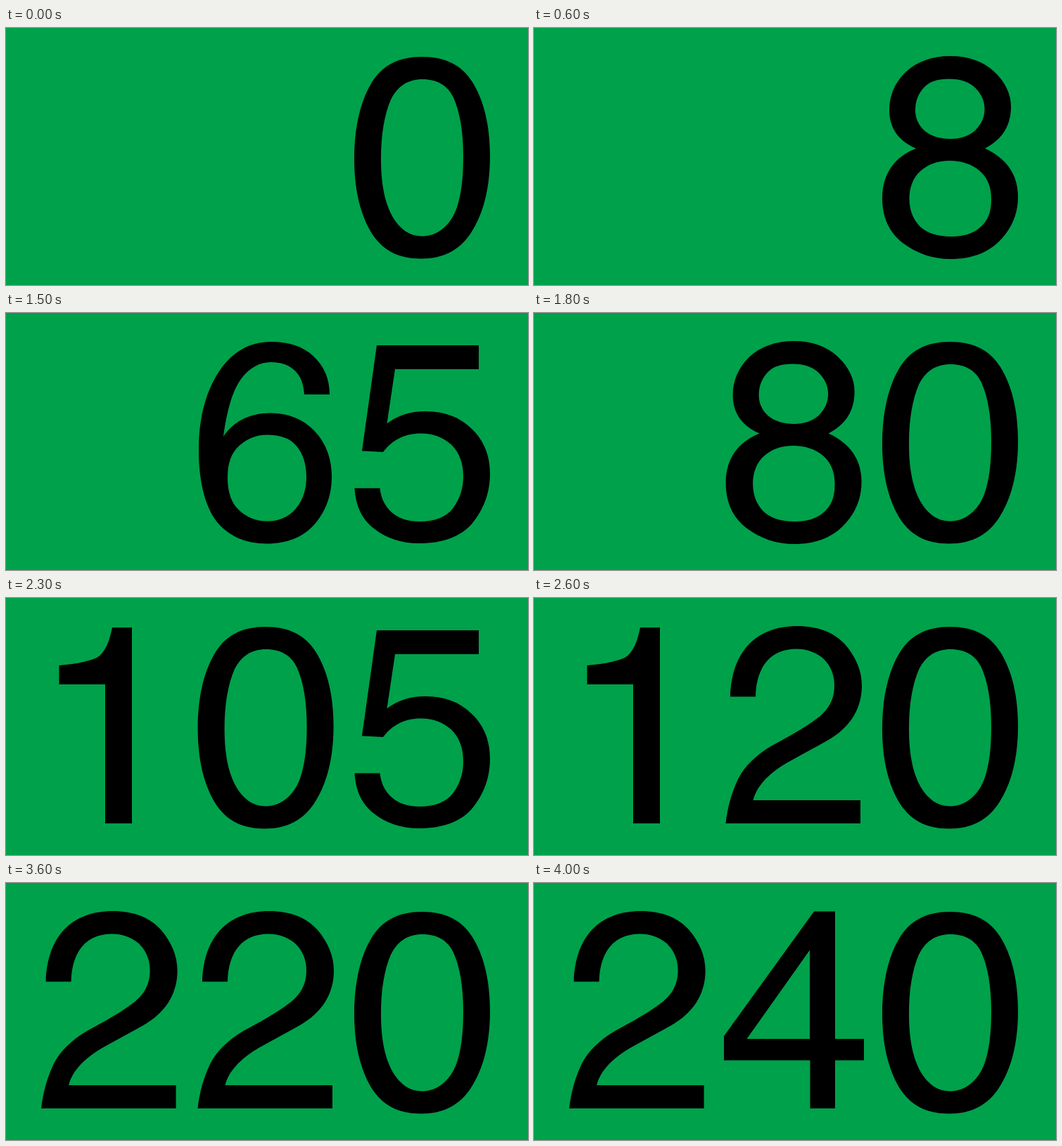
Write an HTML page that moves like this. It is 742 by 366 pixels and loops after 5 s.

```html
<!DOCTYPE html>
<html lang="en">
<head>
<meta charset="utf-8">
<title>Counter</title>
<style>
  html, body { margin: 0; width: 100%; height: 100%; overflow: hidden; background: #00a14b; }
  svg { display: block; width: 742px; height: 366px; }
</style>
</head>
<body>
<svg id="stage" viewBox="0 0 742 366" role="img" fill="#000" fill-rule="evenodd"></svg>
<script>
const PITCH = 222.4;
const KERN_11 = 29.7;
const TICK = 100;
const LOOP = 5000;

// Each digit: the column it is drawn in (0 units, 1 tens, 2 hundreds) and its outline.
const NINE = `M277 253.5H313C314 268 318 280 327 288C336 296 347 299.5 360 299.5
  C377 299.5 392 291 404 274C415 258 423 231 428 193.5C414 215 391 227 361 227
  C335 227 314 218 298 201C282 184 274 162 274 136C274 109 283 86 299 68
  C315 50 338 41 366 41C397 41 421 52 438 73C455 96 463 131 463 175
  C463 220 453 257 435 285C416 314 391 328.5 360 328.5
  C335 328.5 315 322 300 308C285 294 277 276 277 253.5Z
  M366 73C349 73 335 79 325 91C315 103 310 118 310 136C310 155 315 169 324 180
  C333 191 347 196 366 196C382 196 395 190 406 180C417 170 422 155 422 135
  C422 115 417 100 407 90C396 79 382 73 366 73Z`;

const DIGITS = [
  { col: 0, d: `M591 41C625 41 648 53 663 77C679 103 688 138 688 182
    C688 227 679 263 662 290C646 316 622 328.5 590 328.5C558 328.5 535 317 519 291
    C503 264 495 229 495 186C495 143 503 107 518 81C533 54 557 41 591 41Z
    M592 73C613 73 628 82 636 99C645 119 650 147 650 183C650 222 645 250 636 267
    C625 287 609 296.5 591 296.5C574 296.5 560 287 549 268C538 248 533 220 533 187
    C533 151 538 123 547 102C557 82 572 73 592 73Z` },
  { col: 2, d: `M179 42V321H141V123H75.5V96C102 94 121 89 130 84.5C140 78 147 63 151 42Z` },
  { col: 1, d: `M279 140.5H315C316 97 337 72.5 373 72.5C389 72.5 402 78 412 87
    C422 97 427 110 427 125C427 140 422 153 411 164C399 176 374 191 337 211
    C314 225 299 240 290 258C281 277 275 298 272.5 321H464V288H311.5
    C316 269 332 251 359 235C378 224 398 214 417 203C449 185 466 158 466 125
    C466 104 458 85 443 67C427 49 404 40 374 40C316 40 281 76 279 140.5Z` },
  { col: 0, d: `M500 130C502 72 533 40 590 40C643 40 676 68 676 117
    C676 144 664 162 640 172C672 184 688.6 207 688.6 241C688.6 295 651 329 590 329
    C530 329 497 299 494 239H530C532 278 552 297 591 297C628 297 650 277 650 242
    C650 206 628 189 588 189L568 189.5V159H588C622 159 638 147 638 117
    C638 90 620 72.5 590 72.5C555 72.5 538 92 536 130Z` },
  { col: 1, d: `M398 40.5H428V222H469V252.5H428V321H392.5V252.5H270V218Z
    M392 95.5L302.5 222H392Z` },
  { col: 0, d: `M527 46H672V80H553L541.5 157.5C556 146 574 140 597 140
    C623 140 645 148 662 165C680 182 688 204 688 229C688 256 679 279 664 298
    C648 318 622 328 587 328C562 328 541 321 523 307C506 294 497 275 495.5 249.5H531.5
    C533 264 539 276 549 284.5C559 293 572 297 588 297C609 297 625 291 635 278.5
    C645 265 650 250 650 233C650 213 644 198 633 187.5C621 177 607 171.5 590 171.5
    C566 171.5 549 181 536 198L506 196.5Z` },
  { col: 1, d: NINE, turn: " rotate(180 368.5 184.75)" },
  { col: 0, d: `M495 46H691.5V75.5C635 150 606 230 596 321H557C571 240 603 161 654 80H495Z` },
  { col: 0, d: `M592 40C617 40 638 47 654 62C670 77 678 94 678 112C678 140 665 159 641 171.5
    C672 186 688 209 688 240C688 265 679 286 661 304C644 321 620 329 593 329
    C566 329 544 321 524 306C505 291 495 270 495 242C495 208 512 184 543 171.5
    C518 161 505 142 505 117C505 96 513 78 528 63C544 48 565 40 592 40Z
    M590 72.5C606 72.5 619 77 627 85C636 94 640.5 104 640.5 115C640.5 127 636 137 627 146
    C618 154 606 158 592 158C577 158 565 154 556 147C547 139 542 129 542 117
    C542 104 546 94 554 85C562 76 574 72.5 590 72.5Z
    M591 189C608 189 622 194 633 203C645 213 650 227 650 244C650 262 645 275 634 284
    C624 293 610 297 593 297C574 297 559 292 549 283C539 273 533.5 259 533.5 243
    C533.5 227 539 213 549 204C560 194 574 189 591 189Z` },
  { col: 1, d: NINE },
];

// Counter runs as [increment, repeats]; the last value holds until the loop ends.
const RUNS = [[1, 4], [2, 3], [10, 3], [5, 16], [10, 11], [3, 2], [4, 1]];
const values = [0];
for (const [step, count] of RUNS) {
  for (let i = 0; i < count; i++) values.push(values.at(-1) + step);
}

const stage = document.getElementById("stage");
const columns = [0, 1, 2].map(() =>
  stage.appendChild(document.createElementNS("http://www.w3.org/2000/svg", "path")));
let shown = -1;

function show(value) {
  if (value === shown) return;
  shown = value;
  const text = String(value);
  stage.setAttribute("aria-label", text);
  let kern = 0;
  columns.forEach((path, place) => {
    const char = text.at(-1 - place);
    if (char === undefined) {
      path.setAttribute("d", "");
      return;
    }
    if (place && char === "1" && text.at(-place) === "1") kern += KERN_11;
    const { col, d, turn = "" } = DIGITS[char];
    path.setAttribute("d", d);
    path.setAttribute("transform", `translate(${(col - place) * PITCH + kern} 0)${turn}`);
  });
}

const start = performance.now();

function draw() {
  const time = (performance.now() - start) % LOOP;
  show(values[Math.min(Math.floor(time / TICK), values.length - 1)]);
  requestAnimationFrame(draw);
}
draw();
</script>
</body>
</html>
```
